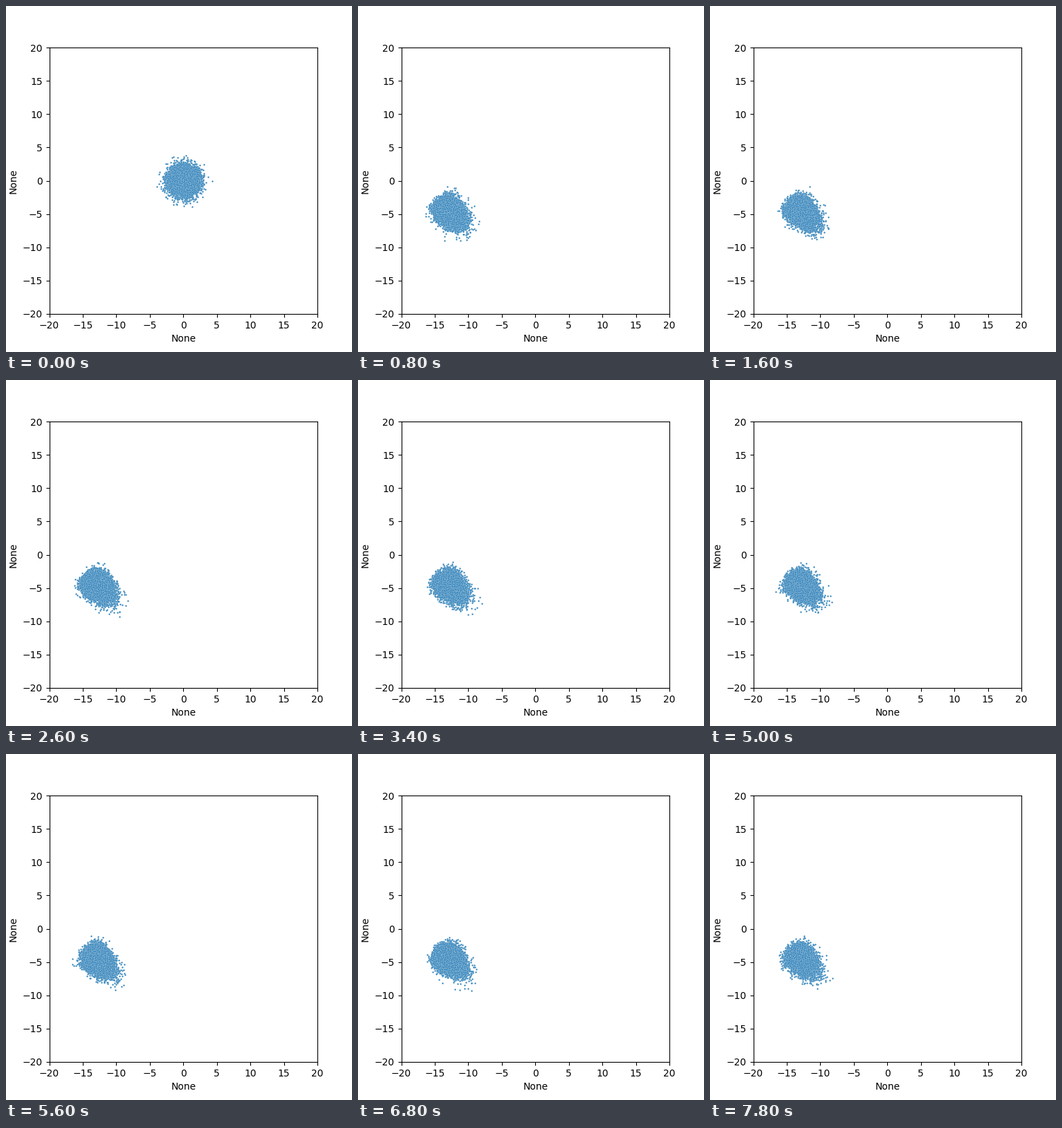
These frames come from a looping animation (500 px wide and 500 px high, 8 s). A matplotlib script:

```python
import numpy as np
import matplotlib.pyplot as plt
from matplotlib.animation import FuncAnimation

FRAMES, INTERVAL = 40, 200
POINTS = 10000
CENTER = np.array([-12.88, -4.57])
LONG_AXIS = np.array([1, -1]) / np.sqrt(2)
SHORT_AXIS = np.array([1, 1]) / np.sqrt(2)


def cloud(frame):
    """Round normal cloud first, then a skewed one resampled on every step."""
    rng = np.random.default_rng(100 + frame)
    g = rng.standard_normal((POINTS, 2))
    if frame == 0:
        return g
    spread = 1.08 if frame == 1 else 1.0
    along = 1.15 * g[:, 0] + 0.1 * (g[:, 0] ** 2 - 1)
    across = 0.85 * g[:, 1]
    shape = np.outer(along, LONG_AXIS) + np.outer(across, SHORT_AXIS)
    return CENTER + spread * shape


plt.rcParams["font.family"] = "DejaVu Sans"
fig, ax = plt.subplots(figsize=(5, 5), dpi=100)
ax.set(xlim=(-20, 20), ylim=(-20, 20), xlabel="None", ylabel="None")
ticks = np.arange(-20, 21, 5)
ax.set_xticks(ticks)
ax.set_yticks(ticks)
dots = ax.scatter(*cloud(0).T, s=3, color="#1f77b4",
                  edgecolor="white", linewidth=0.14)


def update(frame):
    dots.set_offsets(cloud(frame))
    return (dots,)


anim = FuncAnimation(fig, update, frames=FRAMES, interval=INTERVAL,
                     init_func=lambda: update(0), repeat=True, repeat_delay=0)
plt.show()
```
